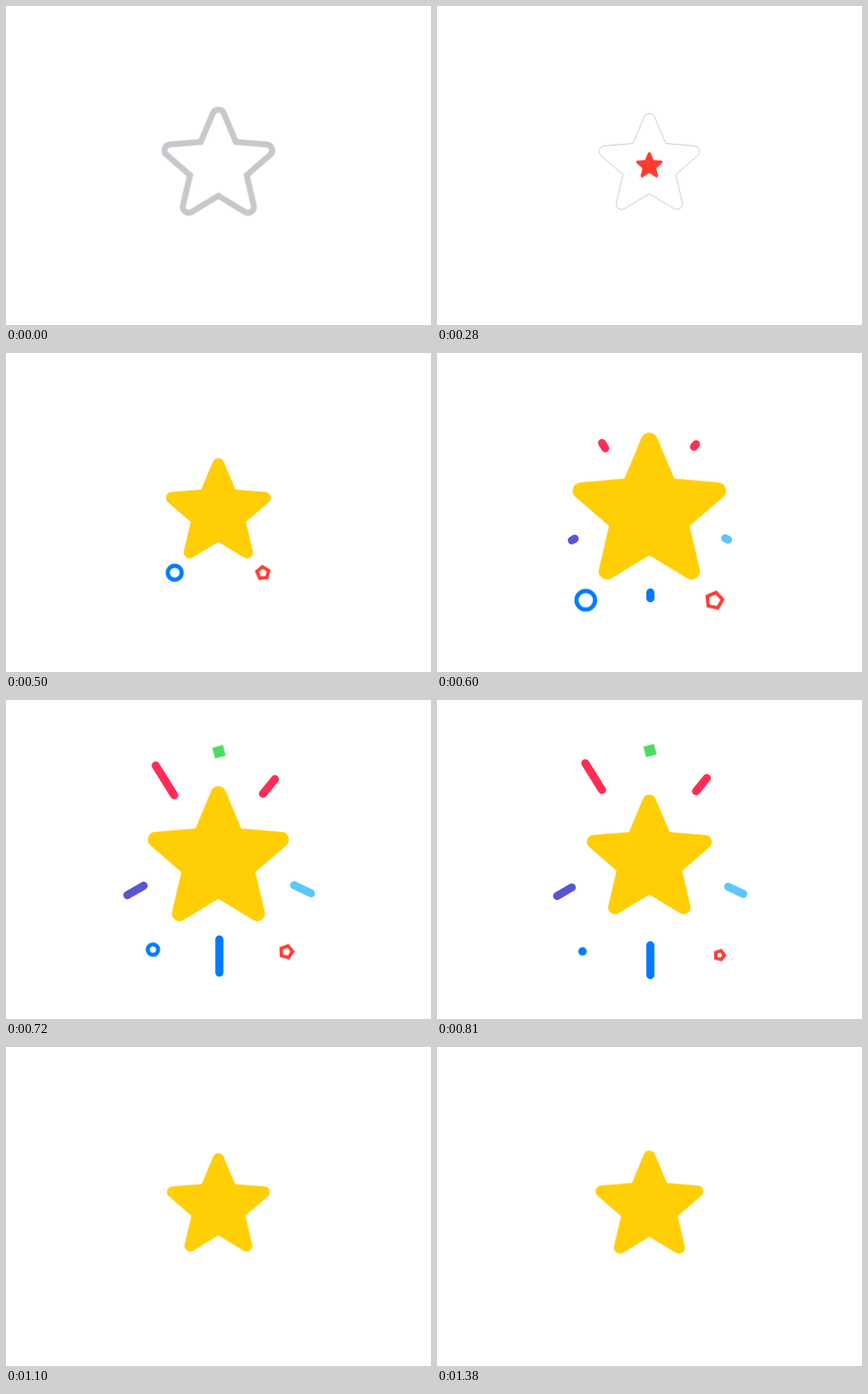
An HTML page that plays this animation: 500 px wide and 375 px high, repeating every 1.41 s.

```html
<!DOCTYPE html>
<html lang="en">
<head>
<meta charset="utf-8">
<title>Star burst</title>
<style>
  html, body { margin: 0; width: 100%; height: 100%; overflow: hidden; background: #fff; }
  svg { display: block; width: 500px; height: 375px; }

  /* One shared 1410 ms timeline */
  .outline, .red, .gold, .ring, .penta, .square, .rays line {
    animation: 1410ms linear infinite both;
  }
  #star, .ring, .penta { vector-effect: non-scaling-stroke; }

  .outline { fill: none; stroke: #c7c7cc; animation-name: outline; }
  .red { fill: #ff3b30; animation-name: red; }
  .gold { fill: #ffce05; animation-name: gold; }
  .ring { fill: none; stroke: #007aff; stroke-width: 4.8px; animation-name: ring; }
  .penta { fill: none; stroke: #ff3b30; stroke-width: 4px; animation-name: penta; }
  .square { fill: #4cd964; animation-name: square; }
  .rays line { stroke-width: 9.5px; stroke-linecap: round; animation-name: ray; }

  @keyframes outline {
    0%, 10.64% { transform: scale(1.055); stroke-width: 7px; visibility: visible; }
    19.86% { transform: scale(.985); stroke-width: 1px; }
    21.3% { transform: scale(.975); stroke-width: 0; visibility: visible; }
    21.42%, 100% { transform: scale(.975); stroke-width: 0; visibility: hidden; }
  }

  @keyframes red {
    0%, 17.02% { transform: scale(0); }
    19.86% { transform: scale(.25); animation-timing-function: cubic-bezier(.3, .4, .65, 1); }
    28.37%, 42.5% { transform: scale(1); }
    42.55%, 100% { transform: scale(0); }
  }

  @keyframes gold {
    0%, 28.37% { transform: scale(0); }
    29.08% { transform: scale(.055); animation-timing-function: cubic-bezier(.3, .4, .6, 1); }
    42.55% { transform: scale(1.502); animation-timing-function: cubic-bezier(.4, 0, .7, .7); }
    57.45% { transform: scale(1.225); animation-timing-function: cubic-bezier(.3, .35, .6, 1); }
    72.34% { transform: scale(.99); animation-timing-function: ease-in-out; }
    88.65%, 100% { transform: scale(1.055); }
  }

  @keyframes ring {
    0%, 32.62% { transform: scale(0); visibility: hidden; }
    32.7% { transform: scale(.2); visibility: visible; animation-timing-function: cubic-bezier(.2, .7, .4, 1); }
    42.55% { transform: translate(-74.8px, 102.5px); }
    57.45% { transform: translate(-78.6px, 107.5px) scale(.24); stroke-width: 4.8px; }
    62.41%, 100% { transform: translate(-79px, 108px) scale(.01); stroke-width: 0; }
  }

  @keyframes penta {
    0%, 32.62% { transform: rotate(-60deg) scale(0); visibility: hidden; }
    32.7% { transform: rotate(-60deg) scale(.2); visibility: visible; animation-timing-function: cubic-bezier(.2, .7, .4, 1); }
    42.55% { transform: translate(76.5px, 102.8px) rotate(-6deg) scale(1); }
    57.45% { transform: translate(82.7px, 112px) rotate(0deg) scale(.57); stroke-width: 4px; }
    65.96%, 100% { transform: translate(84px, 114px) rotate(4deg) scale(.01); stroke-width: 0; }
  }

  @keyframes square {
    0%, 40.78% { transform: rotate(-75deg); visibility: hidden; }
    40.8% { transform: rotate(-75deg); visibility: visible; animation-timing-function: cubic-bezier(.16, 1, .3, 1); }
    57.45% { transform: translate(.8px, -128.5px) rotate(-15deg) scale(1); }
    65.96%, 100% { transform: translate(.8px, -130px) rotate(-5deg) scale(0); }
  }

  @keyframes ray {
    0%, 41.6% { stroke-dasharray: 0 200; stroke-dashoffset: 0; visibility: hidden; }
    41.7% {
      stroke-dasharray: 0 200; stroke-dashoffset: 0; visibility: visible;
      animation-timing-function: cubic-bezier(.3, .55, .6, .95);
    }
    51.06% { stroke-dasharray: 93 200; stroke-dashoffset: 0; }
    57.45% {
      stroke-dasharray: 84 200; stroke-dashoffset: -16;
      animation-timing-function: cubic-bezier(.3, .2, .6, 1);
    }
    68% { stroke-dasharray: 0 200; stroke-dashoffset: -100; visibility: visible; }
    68.09%, 100% { stroke-dasharray: 0 200; stroke-dashoffset: -100; visibility: hidden; }
  }
</style>
</head>
<body>
<svg viewBox="0 0 500 375">
  <defs>
    <path id="star" d="M-6.09-58.76A6.6 6.6 0 0 1 6.09-58.76L19.51-26.86
      L54-23.95A6.6 6.6 0 0 1 57.77-12.37L31.57 10.26
      L39.47 43.96A6.6 6.6 0 0 1 29.61 51.12L0 33.2
      L-29.61 51.12A6.6 6.6 0 0 1-39.47 43.96L-31.57 10.26
      L-57.77-12.37A6.6 6.6 0 0 1-54-23.95L-19.51-26.86Z"/>
  </defs>

  <g class="rays">
    <line x1="198" y1="112" x2="174.5" y2="74.3" pathLength="100" stroke="#ff2d55"/>
    <line x1="302.3" y1="110.2" x2="317.5" y2="91.8" pathLength="100" stroke="#ff2d55"/>
    <line x1="162" y1="218.3" x2="141.3" y2="230.3" pathLength="100" stroke="#5856d6"/>
    <line x1="339" y1="217.8" x2="360.3" y2="228" pathLength="100" stroke="#5ac8fa"/>
    <line x1="251" y1="281.5" x2="251" y2="323.5" pathLength="100" stroke="#007aff"/>
  </g>

  <g transform="translate(249.8 188)">
    <circle class="ring" r="11"/>
    <polygon class="penta" points="9.7,0 3,9.2 -7.85,5.7 -7.85,-5.7 3,-9.2"/>
    <rect class="square" x="-6.5" y="-6.5" width="13" height="13"/>
    <use class="outline" href="#star"/>
    <use class="red" href="#star"/>
    <use class="gold" href="#star"/>
  </g>
</svg>
</body>
</html>
```
